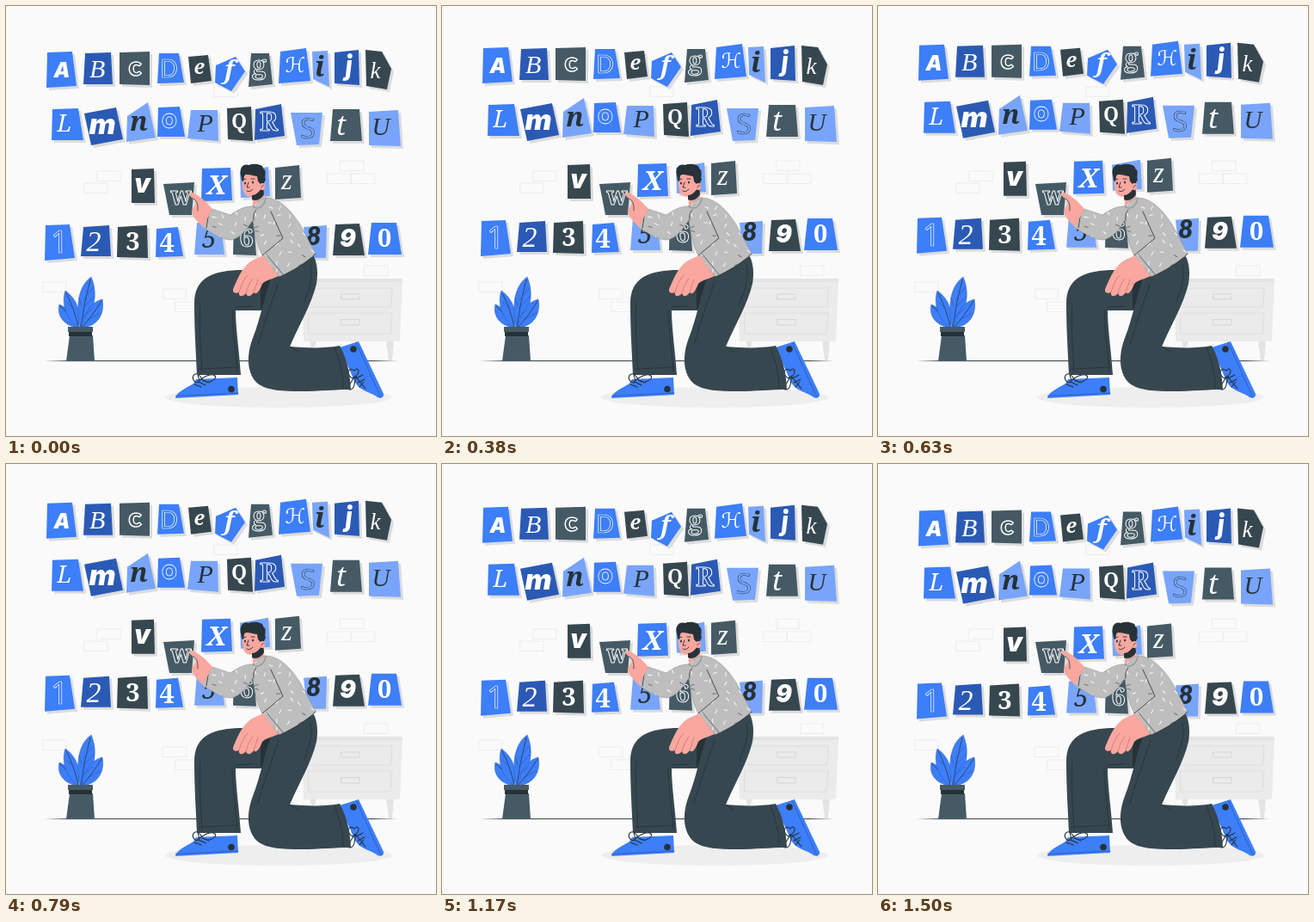
Recreate the animation shown at these times as an HTML page with a canvas. Size 500x500 px, loop 1.54 s.

```html
<!DOCTYPE html>
<html lang="en">
<head>
<meta charset="utf-8">
<title>Cut-out letters</title>
<style>
html, body { margin: 0; width: 100%; height: 100%; overflow: hidden; background: #fafafa; }
canvas { display: block; width: 100vw; height: 100vh; }
</style>
</head>
<body>
<canvas id="stage"></canvas>
<script>
const SIZE = 500, LOOP = 1540, STEP = 1000 / 24, LIFT = 10;
const BLUE = '#3d7ef9', NAVY = '#2b5ab5', SKY = '#78a5fb';
const SLATE = '#455a64', DARK = '#37474f', INK = '#263238', WHITE = '#fff';
const SKIN = '#f9a79f', WOOL = '#bebebe', PALE = '#ebebeb', LINE = '#dedede';

const canvas = document.getElementById('stage');
const ctx = canvas.getContext('2d');
const ratio = Math.max(1, window.devicePixelRatio || 1);
canvas.width = canvas.height = SIZE * ratio;

function fill(d, color) {
  ctx.fillStyle = color;
  ctx.fill(new Path2D(d));
}

function stroke(d, color = INK, width = 1) {
  ctx.strokeStyle = color;
  ctx.lineWidth = width;
  ctx.stroke(new Path2D(d));
}

function dot(x, y, rx, color, ry = rx, turn = 0) {
  ctx.fillStyle = color;
  ctx.beginPath();
  ctx.ellipse(x, y, rx, ry, turn, 0, Math.PI * 2);
  ctx.fill();
}

// Centres the ink of a glyph on (x, y).
function glyph(char, font, x, y, color, outline) {
  ctx.font = font;
  ctx.textAlign = 'left';
  ctx.textBaseline = 'alphabetic';
  const m = ctx.measureText(char);
  const left = x + (m.actualBoundingBoxLeft - m.actualBoundingBoxRight) / 2;
  const base = y + (m.actualBoundingBoxAscent - m.actualBoundingBoxDescent) / 2;
  if (outline) {
    ctx.strokeStyle = color;
    ctx.lineWidth = outline;
    ctx.strokeText(char, left, base);
  } else {
    ctx.fillStyle = color;
    ctx.fillText(char, left, base);
  }
}

function card(points, paper, char, font, x, y, color = WHITE, outline = 0) {
  const shape = 'M' + points + 'Z';
  ctx.save();
  ctx.translate(3, 3);
  fill(shape, '#dcdcdc');
  ctx.restore();
  fill(shape, paper);
  glyph(char, font, x, y, color, outline);
}

const heavy = px => `italic 900 ${px}px Lato, sans-serif`;
const black = px => `italic 900 ${px}px Inter, sans-serif`;
const script = px => `italic 400 ${px}px "Liberation Serif", serif`;
const bookish = px => `italic 700 ${px}px "Noto Serif", serif`;
const serif = px => `700 ${px}px "Noto Serif", serif`;
const narrow = px => `300 extra-condensed ${px}px "Noto Sans", sans-serif`;

function drawCards() {
  card('48,54 77,53 82,93 47,95', BLUE, 'A', black(24), 64, 74);
  card('92,55 122,54 124,91 90,91', NAVY, 'B', script(30), 106, 74);
  card('132,54 167,53 167,92 132,91', SLATE, 'c', '900 31px Lato, sans-serif', 150, 73, WHITE, 1.5);
  card('178,55 201,55 207,89 176,90', BLUE, 'D', narrow(29), 190, 73, WHITE, 0.7);
  card('212,59 235,57 239,87 215,90', DARK, 'e', bookish(23), 225, 73);
  card('244,69 267,59 278,76 262,99 243,89', BLUE, 'f', bookish(29), 260, 77);
  card('285,55 306,55 310,91 282,94', SLATE, 'g', serif(29), 295, 74, WHITE, 1);
  card('319,53 349,49 354,87 317,90', BLUE, 'ℋ', '24px "DejaVu Sans", sans-serif', 336, 69);
  card('356,53 374,52 376,94 357,85', SKY, 'i', bookish(32), 365, 70, INK);
  card('382,54 410,51 411,92 382,90', NAVY, 'j', heavy(33), 397, 71);
  card('418,51 437,53 448,73 443,97 419,93', DARK, 'k', script(27), 430, 75);

  card('54,120 84,119 90,156 53,156', BLUE, 'L', 'italic 500 27px "Noto Serif", serif', 67, 136);
  card('91,125 128,118 136,155 99,162', NAVY, 'm', black(33), 112, 140);
  card('141,128 165,112 174,153 140,158', SKY, 'n', bookish(31), 155, 137, INK);
  card('177,118 202,117 208,152 176,152', BLUE, 'O', '900 23px Inter, sans-serif', 190, 134, WHITE, 0.8);
  card('215,121 246,121 247,157 211,154', SKY, 'P', script(30), 231, 137, INK);
  card('257,119 285,117 287,157 258,155', DARK, 'Q', serif(23), 271, 137);
  card('290,120 320,114 324,151 289,156', NAVY, 'R', serif(30), 306, 134, WHITE, 1);
  card('331,124 368,124 364,161 338,162', SKY, 'S', narrow(33), 351, 142, INK, 0.5);
  card('380,120 411,120 414,157 377,157', SLATE, 't', 'italic 500 33px "Noto Serif", serif', 391, 139);
  card('422,123 456,121 459,163 422,162', SKY, 'U', 'italic 500 29px "Liberation Serif", serif', 438, 141, INK);

  card('146,190 172,189 173,229 146,229', DARK, 'v', black(30), 160, 209);
  card('228,189 261,188 263,226 227,227', BLUE, 'X', 'italic 600 31px "Noto Serif", serif', 245, 208);
  card('272,193 305,187 307,221 273,223', SKY, 'y', script(27), 290, 208, INK);
  card('313,188 341,185 343,223 313,225', SLATE, 'z', script(33), 326, 205);

  card('46,255 74,254 80,293 45,296', BLUE, '1', narrow(36), 60, 274, WHITE, 0.7);
  card('90,257 120,255 122,291 87,291', NAVY, '2', script(34), 102, 274);
  card('130,257 164,255 165,293 129,292', DARK, '3', serif(29), 147, 274);
  card('175,259 200,257 206,291 174,292', BLUE, '4', serif(31), 187, 275);
  card('222,252 250,252 254,289 219,289', SKY, '5', 'italic 500 30px "Noto Serif", serif', 236, 270, INK);
  card('265,250 288,250 291,290 264,289', SLATE, '6', serif(29), 280, 270, WHITE, 1);
  card('346,257 373,255 372,293 350,293', SKY, '8', heavy(30), 358, 267, INK);
  card('383,254 411,253 417,290 380,290', DARK, '9', black(28), 398, 270);
  card('425,252 454,252 460,289 421,289', BLUE, '0', serif(29), 440, 270);
}

function drawWall() {
  const bricks = [[106, 192], [91, 206], [389, 180], [374, 195], [402, 195],
                  [417, 302], [43, 321], [183, 329], [197, 344], [242, 94]];
  ctx.strokeStyle = '#ededed';
  ctx.lineWidth = 1;
  for (const [x, y] of bricks) ctx.strokeRect(x, y, 27, 11.5);
  const fade = ctx.createLinearGradient(44, 0, 456, 0);
  fade.addColorStop(0, '#26323800');
  fade.addColorStop(0.07, INK);
  fade.addColorStop(0.93, INK);
  fade.addColorStop(1, '#26323800');
  ctx.fillStyle = fade;
  ctx.fillRect(44, 412.2, 412, 1);
}

function drawCabinet() {
  fill('M442,389 L451,389 449,412 445,412Z M353,389 L361,389 359,397 355,397Z', '#e4e4e4');
  fill('M344,317 L461,317 458,390 346,390Z', PALE);
  fill('M344,317 L461,317 461,321 344,321Z', '#e4e4e4');
  stroke('M352,328 L449,328 448,350 352,350Z M352,357 L449,357 447,381 352,381Z', LINE);
  stroke('M390,335 H411 V341 H390Z M390,364.500 H411 V371 H390Z', '#d5d5d5');
}

function drawPlant() {
  const leaves = [
    ['M84,374 C80,359 75,353 62,347 C59,359 66,372 84,374Z', 'M83,373 Q76,360 63,349'],
    ['M84,374 C88,357 83,341 69,331 C64,346 70,365 84,374Z', 'M84,373 Q79,350 70,334'],
    ['M86,374 C81,348 84,326 99,315 C107,333 104,356 87,374Z', 'M87,373 Q91,345 98,318'],
    ['M88,374 C92,354 99,345 112,341 C115,358 107,372 89,374Z', 'M89,373 Q100,361 111,343']
  ];
  for (const [leaf, vein] of leaves) {
    fill(leaf, BLUE);
    stroke(leaf, NAVY, 0.5);
    stroke(vein, INK, 0.7);
  }
  stroke('M88,363 L100,352 M89,352 L102,338 M90,342 L101,328 M88,349 L85,339 M79,352 L70,344 M95,365 L109,357', NAVY, 0.7);
  fill('M74,383 H101 L103,413 H70Z', SLATE);
  fill('M72,373 H101 V379 H72Z', SLATE);
  fill('M73,379 H100 V384 H73Z', INK);
}

function drawShoes() {
  fill('M221,434 L269,432 270,452 197,456 C198,449 208,445 218,439Z', BLUE);
  stroke('M197.500,453.500 L270,450', NAVY, 0.8);
  dot(262, 445.500, 3.8, INK);
  stroke('M222,438 C212,434 220,422 226,431 C232,443 247,434 243,430 C238,426 228,432 222,438 M225,435 C219,421 228,419 231,425 M219,440 L227,443 M224,437 L232,441 M229,435 L236,438', INK, 1.1);

  fill('M388,397 L410,390 439,451 C440,455 435,457 432,455 C422,447 409,449 403,431Z', BLUE);
  stroke('M407,391 L436,455', NAVY, 0.8);
  dot(404, 399, 3.8, INK);
  stroke('M405,424 C394,417 398,436 405,432 C413,427 410,418 405,424 M405,431 C400,440 395,446 400,446 C406,446 406,436 406,431 M407,433 L415,429 M409,438 L417,434 M411,443 L416,437 M406,430 L418,445', INK, 1.1);
}

function drawLegs() {
  fill('M336,292 C322,304 304,308 276,307 C240,307 219,316 219,346 C219,377 221,404 222,429 L273,429 C271,400 267,374 267,354 L306,354 C326,341 341,322 350,296Z', DARK);
  stroke('M228,424 C226,393 224,364 226,345 M263,353 C264,381 268,410 269,425 M225,422 L270,420 M267,350 L287,349', INK, 0.8);
  fill('M296,319 L315,313 C309,335 300,350 296,353 Z', INK);
  fill('M310,311 C301,335 296,363 287,386 C279,407 280,429 294,440 C304,447 322,448 343,448 C365,448 381,446 401,446 C400,428 397,411 388,395 C365,399 347,397 330,396 C341,370 355,348 361,323 C363,310 362,300 358,291 L324,308Z', DARK);
  stroke('M317,321 C307,350 299,373 293,394 M330,396 L340,402 M354,301 C357,316 352,332 346,345 M382,398 C389,414 392,431 392,444', INK, 0.8);
}

const torso = 'M288,233 C293,224 302,221 312,225 C325,230 334,242 342,254 L360,288 C350,297 337,306 318,315 L298,290 C292,279 289,264 287,249 C281,258 273,270 262,272 C251,272 239,264 228,257 L240,236 L261,243 C269,237 279,232 288,233Z';

function drawSpecks() {
  let seed = 7;
  const random = () => (seed = seed * 16807 % 2147483647) / 2147483647;
  ctx.save();
  ctx.clip(new Path2D(torso));
  ctx.lineWidth = 1.1;
  for (let y = 228; y < 315; y += 11) {
    for (let x = 234; x < 362; x += 13) {
      const px = x + random() * 8, py = y + random() * 7, a = random() * Math.PI;
      ctx.strokeStyle = random() < 0.8 ? '#f5f5f5' : '#777';
      ctx.beginPath();
      ctx.moveTo(px, py);
      ctx.lineTo(px + 4 * Math.cos(a), py + 4 * Math.sin(a));
      ctx.stroke();
    }
  }
  ctx.restore();
}

function drawHead() {
  fill('M286,215 L299,208 301,227 C301,235 290,238 287,233Z', SKIN);
  fill('M275,197 C274,205 275,217 279,220 C284,224 293,221 298,213 L301,200 293,192 279,190Z', SKIN);
  fill('M286,220 C292,220 296,214 299,208 L300,219 C296,226 290,227 286,225Z', INK);
  fill('M273,197 C271,188 276,183 282,185 C290,182 300,185 299,189 C304,191 300,199 302,202 L298,209 293,204 292,198 C285,197 278,194 277,198 L276,204 C273,204 274,199 273,197Z', INK);
  dot(298, 210, 3.2, SKIN, 4, 0.2);
  stroke('M297,211 Q298,207 300,209', INK, 0.7);
  dot(278, 206, 1, INK, 1.5);
  dot(287, 205, 1, INK, 1.5);
  stroke('M276,202 L279,201 M285,201 L289,201 M282,205 L280,211 L283,211 M280,215 Q284,217 287,213', INK, 0.9);
}

function drawMan() {
  dot(317, 455, 132, '#eeeeee', 12);
  drawShoes();
  drawLegs();
  drawHead();
  fill(torso, WOOL);
  drawSpecks();
  stroke(torso, '#8c8c8c', 0.5);
  stroke('M288,249 C287,243 289,239 291,237 M308,239 L322,270 L298,290 M318,315 C334,308 349,299 360,288 M236,239 L233,258', INK, 0.8);
  stroke('M287,233 C293,238 301,233 302,223', '#999', 1.5);
  stroke('M302,288 L322,312', INK, 0.6);
  fill('M299,290 L317,314 C309,318 301,319 298,323 C295,331 291,337 288,333 C284,339 280,338 279,334 C275,339 270,338 271,333 C266,335 262,333 265,327 C270,315 276,302 286,296Z', SKIN);
  stroke('M279,334 C281,326 284,321 287,317 M271,333 C274,323 277,317 281,313 M288,333 L293,318', '#cf756f', 0.8);
}

function drawHeldCard() {
  card('183,207 219,205 216,243 190,243', SLATE, 'w', serif(28), 203, 223, WHITE, 1);
  fill('M240,236 C233,228 226,221 217,217 C211,216 212,221 218,224 C222,227 221,232 217,236 C214,242 221,249 229,257Z', SKIN);
  stroke('M218,224 Q224,227 223,238', INK, 0.7);
}

function liftAt(time) {
  const step = Math.min(36, Math.floor((time + 3) / STEP) + 1);
  return LIFT * (1 - Math.abs(step / 18 - 1));
}

function draw(now) {
  ctx.setTransform(ratio, 0, 0, ratio, 0, 0);
  ctx.lineCap = ctx.lineJoin = 'round';
  ctx.fillStyle = '#fafafa';
  ctx.fillRect(0, 0, SIZE, SIZE);
  drawWall();
  drawCabinet();
  drawPlant();
  ctx.save();
  ctx.translate(0, 0.55 - liftAt(now % LOOP));
  drawCards();
  ctx.restore();
  drawMan();
  drawHeldCard();
}

const start = performance.now();
function tick() {
  draw(performance.now() - start);
  requestAnimationFrame(tick);
}
tick();
</script>
</body>
</html>
```
